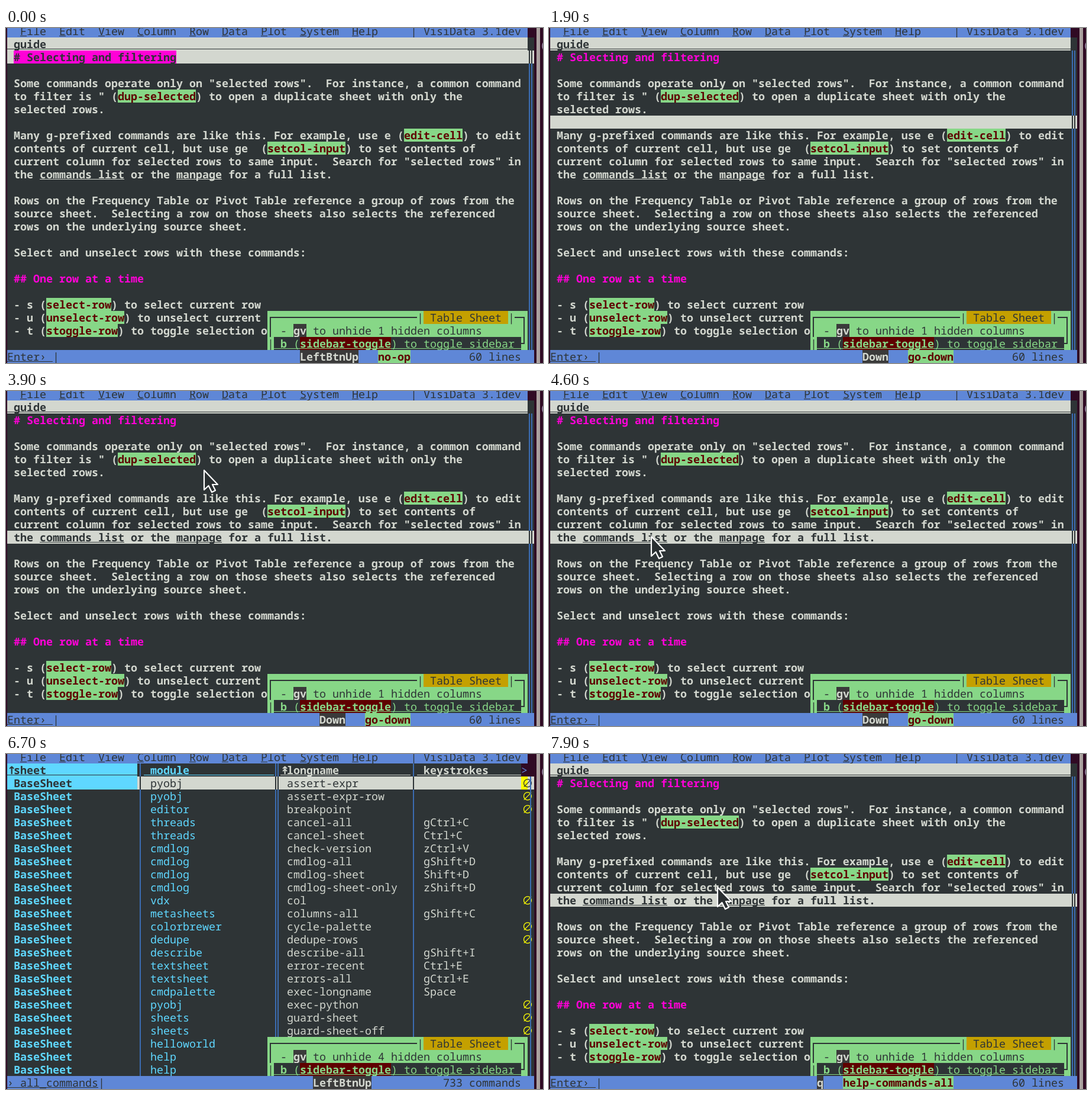
Animation, 908 px wide and 566 px high, one loop 8 s. Source, as an HTML page:

```html
<!DOCTYPE html>
<html lang="en">
<head>
<meta charset="utf-8">
<title>Terminal guide</title>
<style>
  html, body { margin: 0; width: 100%; height: 100%; overflow: hidden; background: #300a24; }
  svg { display: block; width: 908px; height: 566px; }
  text {
    font: 18.3333px "Noto Sans Mono", "Liberation Mono", "DejaVu Sans Mono", monospace;
    white-space: pre;
    text-rendering: geometricPrecision;
  }
  .b { font-weight: 700; }
  .arrow { font-family: "DejaVu Sans", sans-serif; }
  rect { shape-rendering: crispEdges; }
</style>
</head>
<body>
<svg viewBox="0 0 908 566">
  <g id="screen"></g>
  <path id="mouse" d="M1 1V34L8.5 27L14 38L20 35L15 25H24Z" fill="#2a2f31" stroke="#fff" stroke-width="2.2" stroke-linejoin="round"/>
</svg>
<script>
const LOOP = 8000;
const CW = 11, CH = 22;
const BG = '#2e3436', FG = '#d3d7cf', BLUE = '#5f87d7', SEP = '#3b6cb2', GREEN = '#87d787',
  RED = '#5f0000', PINK = '#ff00d7', CYAN = '#5fd7ff', GOLD = '#c4a000', YELLOW = '#ffff00',
  KEY = '#3a3a3a', PURPLE = '#300a24';

const px = c => 2 + c * CW;
const py = r => r * CH - 6;
const rect = (x, y, w, h, fill) => `<rect x="${x}" y="${y}" width="${w}" height="${h}" fill="${fill}"/>`;
const fill = (c, r, w, color, h = 1) => rect(px(c), py(r), w * CW, h * CH, color);
const rule = (c, r, w, color) => rect(px(c), py(r) + 19, w * CW, 1, color);
const vline = (x, r, h, color) => rect(x, py(r), 2, h * CH, color);

function put(c, r, s, fg, { bg, bold, line, cls = '' } = {}) {
  return (bg ? fill(c, r, s.length, bg) : '') +
    `<text x="${px(c)}" y="${py(r) + 18}" fill="${fg}" class="${bold ? 'b ' : ''}${cls}">${s}</text>` +
    (line ? rule(c, r, s.length, fg) : '');
}

// [name] marks a command, _name_ a link
const GUIDE = [
  '# Selecting and filtering',
  '',
  'Some commands operate only on "selected rows".  For instance, a common command',
  'to filter is " ([dup-selected]) to open a duplicate sheet with only the',
  'selected rows.',
  '',
  'Many g-prefixed commands are like this. For example, use e ([edit-cell]) to edit',
  'contents of current cell, but use ge  ([setcol-input]) to set contents of',
  'current column for selected rows to same input.  Search for "selected rows" in',
  'the _commands list_ or the _manpage_ for a full list.',
  '',
  'Rows on the Frequency Table or Pivot Table reference a group of rows from the',
  'source sheet.  Selecting a row on those sheets also selects the referenced',
  'rows on the underlying source sheet.',
  '',
  'Select and unselect rows with these commands:',
  '',
  '## One row at a time',
  '',
  '- s ([select-row]) to select current row',
  '- u ([unselect-row]) to unselect current',
  '- t ([stoggle-row]) to toggle selection o',
  ''
];

// module, longname, keystrokes
const COMMANDS = `pyobj assert-expr
pyobj assert-expr-row
editor breakpoint
threads cancel-all gCtrl+C
threads cancel-sheet Ctrl+C
cmdlog check-version zCtrl+V
cmdlog cmdlog-all gShift+D
cmdlog cmdlog-sheet Shift+D
cmdlog cmdlog-sheet-only zShift+D
vdx col
metasheets columns-all gShift+C
colorbrewer cycle-palette
dedupe dedupe-rows
describe describe-all gShift+I
textsheet error-recent Ctrl+E
textsheet errors-all gCtrl+E
cmdpalette exec-longname Space
pyobj exec-python
sheets guard-sheet
sheets guard-sheet-off
helloworld
help
help`.split('\n').map(s => s.split(' '));

const MENU = { File: 2, Edit: 8, View: 14, Column: 20, Row: 28, Data: 33, Plot: 39, System: 45, Help: 53 };

function frame() {
  let out = rect(0, 0, 908, 566, PURPLE) + fill(0, 1, 81, BG, 24) +
    rect(897, 0, 6, 566, '#aaa19f') +
    '<path d="M909 24Q905 30 909 37" fill="none" stroke="#a99ab8" stroke-width="1.5"/>' +
    fill(0, 0, 80, BLUE);
  for (const name in MENU) out += put(MENU[name], 0, name, BG) + rule(MENU[name], 0, 1, BG);
  return out + put(62, 0, '| VisiData 3.1dev', BG);
}

function guideLine(s, r, on) {
  let out = on ? fill(0, r, 81, FG) : '';
  if (s[0] === '#') return out + put(1, r, s, on ? BG : PINK, { bg: on && PINK, bold: true });
  if (on && r === 9) out += fill(37, r, 1, CYAN);
  let c = 1;
  for (const part of s.split(/(\[.*?\]|_.*?_)/)) {
    const chip = part[0] === '[', link = part[0] === '_';
    const word = chip || link ? part.slice(1, -1) : part;
    out += chip
      ? put(c, r, word, on ? GREEN : RED, { bg: on ? RED : GREEN, bold: true })
      : put(c, r, word, on ? BG : FG, { bold: true, line: link });
    c += word.length;
  }
  return out;
}

function guide(row) {
  let out = fill(0, 1, 80, FG) + put(1, 1, 'guide', BG, { bold: true }) + rule(0, 1, 80, BG);
  GUIDE.forEach((s, i) => {
    const r = i + 2, color = r === row ? BG : SEP;
    out += guideLine(s, r, r === row) + vline(884, r, 1, color) + vline(888, r, 1, color);
  });
  return out;
}

function table() {
  const bold = { bold: true };
  let out = fill(79, 1, 2, PURPLE) + fill(0, 1, 20, CYAN) +
    put(0, 1, '↑', BG, { cls: 'arrow', bold: true }) + put(1, 1, 'sheet', BG, bold) + rule(0, 1, 20, BG) +
    put(22, 1, 'module', CYAN, bold) + rule(21, 1, 20, CYAN) +
    put(42, 1, '↟', FG, { cls: 'arrow', bold: true }) + put(43, 1, 'longname', FG, bold) + rule(42, 1, 20, FG) +
    put(64, 1, 'keystrokes', FG, bold) + rule(63, 1, 16, FG) +
    put(79, 1, '&gt;', BLUE);
  COMMANDS.forEach(([module, name, keys], i) => {
    const r = i + 2, on = i === 0;
    if (on) out += fill(0, r, 20, CYAN) + fill(20, r, 61, FG) + fill(79, r, 1, YELLOW);
    out += put(1, r, 'BaseSheet', on ? BG : CYAN, bold) + put(22, r, module, on ? BG : CYAN);
    if (!name) return;
    out += put(43, r, name, on ? BG : FG);
    out += keys ? put(64, r, keys, FG) : put(79, r, '∅', on ? BG : YELLOW);
  });
  for (const x of [226, 455, 459, 688, 886]) {
    const top = x === 886 ? 2 : 1;
    out += vline(x, top, 25 - top, SEP) + (x < 886 ? vline(x, 2, 1, BG) : '');
  }
  return out;
}

function sidebar(hidden) {
  return fill(40, 22, 40, GREEN, 3) +
    `<path d="M447 522V489H695M860 489H876V533H871" fill="none" stroke="${BG}" stroke-width="2"/>` +
    put(63, 22, '|', BG) + put(64, 22, ' Table Sheet ', BG, { bg: GOLD }) + put(77, 22, '|', BG) +
    put(42, 23, '-', BG) + put(44, 23, 'gv', FG, { bg: KEY, bold: true }) +
    put(47, 23, `to unhide ${hidden} hidden columns`, BG) +
    put(40, 24, '|', BG) + fill(41, 24, 38, BG) +
    put(42, 24, 'b', GREEN, { bold: true }) + put(44, 24, '(', GREEN) +
    put(45, 24, 'sidebar-toggle', GREEN, { bg: RED, bold: true }) +
    put(59, 24, ') to toggle sidebar', GREEN) + rule(41, 24, 38, GREEN);
}

function status(left, key, command, count) {
  const end = command ? 62 : 56;
  const at = command ? end - command.length : 0;
  const keyAt = (command ? at - 3 : end) - key.length;
  return fill(0, 25, 81, BLUE) + put(0, 25, left, BG, { line: true }) + put(left.length, 25, '|', BG) +
    put(keyAt, 25, key, FG, { bg: KEY, bold: true }) +
    (command ? put(at, 25, command, RED, { bg: GREEN, bold: true }) : '') +
    put(79 - count.length, 25, count, BG);
}

// time at which the highlight reaches rows 4, 5, 6 ...
const DOWN = [800, 1200, 1600, 1900, 2200, 2400, 2700, 2900];

// pointer: start, end, then one position per 100 ms
const MOVES = [
  { from: 3900, to: 6700, path: [[334, 133], [352, 148], [341, 180], [292, 216], [231, 240], [181, 250], [168, 249], [172, 245]] },
  { from: 7400, to: 8000, path: [[168, 238], [194, 233], [240, 223], [284, 215], [298, 217], [284, 224]] }
];

const screen = document.getElementById('screen');
const mouse = document.getElementById('mouse');
let shown = '';

function view(t) {
  if (t >= 4900 && t < 7000) return 'table';
  const n = DOWN.filter(d => d <= t).length;
  return `guide ${n ? n + 3 : 2} ${t < 800 ? 'LeftBtnUp no-op' : t < 4900 ? 'Down go-down' : 'q help-commands-all'}`;
}

function draw(t) {
  const v = view(t);
  if (v !== shown) {
    const [kind, row, key, command] = v.split(' ');
    screen.innerHTML = frame() + (kind === 'table'
      ? table() + sidebar(4) + status('› all_commands', 'LeftBtnUp', '', '733 commands')
      : guide(+row) + sidebar(1) + status('Enter› ', key, command, '60 lines'));
    shown = v;
  }
  const move = MOVES.find(m => t >= m.from && t < m.to);
  mouse.style.display = move ? '' : 'none';
  if (move) {
    const step = Math.min(Math.floor((t - move.from) / 100), move.path.length - 1);
    mouse.setAttribute('transform', `translate(${move.path[step]})`);
  }
}

const start = performance.now();
function tick() {
  draw((performance.now() - start) % LOOP);
  requestAnimationFrame(tick);
}
tick();
</script>
</body>
</html>
```
